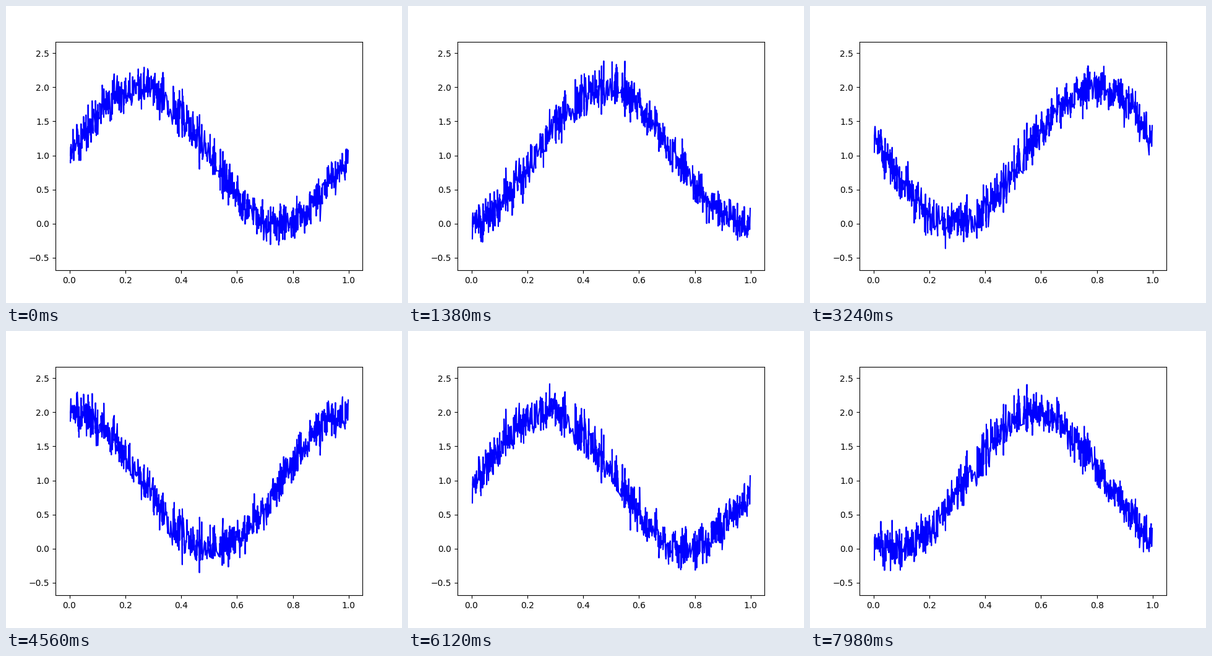
A matplotlib script for the animation above (8 s loop, 640 px wide and 480 px high).

```python
import numpy as np
import matplotlib.pyplot as plt
from matplotlib.animation import FuncAnimation

LOOP_MS = 8000
TICK_MS = 20
STEP_MS = 60
POINTS = 1000
SHIFT = 0.01    # wave travel per step
GRAIN = 0.13    # noise that stays with each point
JITTER = 0.05   # noise redrawn at every step

rng = np.random.default_rng(7)
x = np.sort(rng.uniform(0, 0.999, POINTS))
grain = rng.normal(0, GRAIN, POINTS)


def wave(step):
    jitter = np.random.default_rng([3, step]).normal(0, JITTER, POINTS)
    return 1 + np.sin(2 * np.pi * (x - SHIFT * step)) + grain + jitter


fig, ax = plt.subplots(figsize=(6.4, 4.8), dpi=100)
ax.set_xlim(-0.04995, 1.04895)
ax.set_ylim(-0.685, 2.67)
ax.set_xticks(np.arange(0, 1.01, 0.2))
ax.set_yticks(np.arange(-0.5, 2.51, 0.5))
line, = ax.plot(x, wave(0), color="blue", lw=1.5)


def update(tick):
    line.set_ydata(wave(tick * TICK_MS // STEP_MS))
    return line,


anim = FuncAnimation(fig, update, frames=LOOP_MS // TICK_MS,
                     interval=TICK_MS, repeat=True, repeat_delay=0)
plt.show()
```
